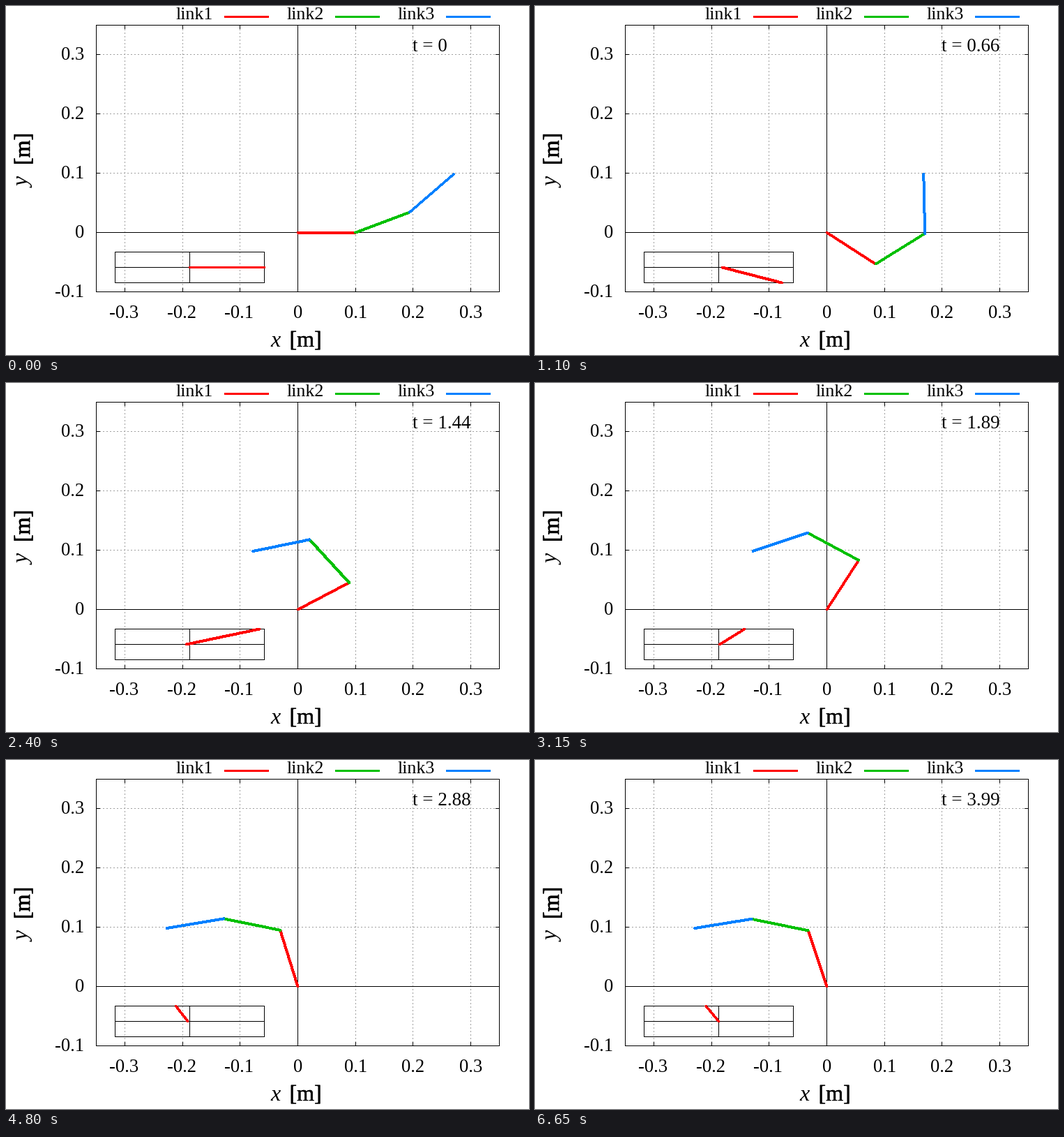
Recreate the animation shown at these times as a matplotlib script. Size 750 by 500 pixels, loop 6.7 s.

```python
import numpy as np
import matplotlib.pyplot as plt
from matplotlib.animation import FuncAnimation
from matplotlib.patheffects import Normal, Stroke

W, H, DPI = 750, 500, 100
PX = 72 / DPI
FRAMES, STEP_MS, DT = 134, 50, 0.03
LINK = 0.1
THICK = 3
RED, GREEN, BLUE = "#ff0000", "#00c000", "#0080ff"

plt.rcParams["font.family"] = "Liberation Serif"
fig = plt.figure(figsize=(W / DPI, H / DPI), dpi=DPI, facecolor="white")
ax = fig.add_axes([0, 0, 1, 1])
ax.set_xlim(0, W)
ax.set_ylim(H, 0)
ax.axis("off")

# Pixel centres of the plot frame and the inset
LEFT, RIGHT, TOP, BOTTOM = 129.5, 707.5, 27.5, 409.5
IN_L, IN_R, IN_T, IN_B = 156.5, 370.5, 352.5, 396.5
IN_X, IN_Y = 263.5, 374.5


def px(x):
    return LEFT + (x + 0.35) / 0.7 * (RIGHT - LEFT)


def py(y):
    return BOTTOM - (y + 0.1) / 0.45 * (BOTTOM - TOP)


def centre(v):
    return np.floor(v) + 0.5


def line(xs, ys, color="black", width=1, **kw):
    return ax.plot(xs, ys, color=color, lw=width * PX, antialiased=False,
                   snap=False, **kw)[0]


def label(x, y, s, size=26.67, heavy=0, **kw):
    txt = ax.text(x, y, s, fontsize=size * PX, va="baseline",
                  rotation_mode="anchor", **kw)
    if heavy:
        txt.set_path_effects([Stroke(linewidth=heavy * PX, foreground="black"),
                              Normal()])
    return txt


def box(l, r, t, b):
    line([l, r, r, l, l], [t, t, b, b, t], zorder=3,
         solid_joinstyle="miter", solid_capstyle="projecting")


def spline(knots, values):
    """Cubic spline at rest at both ends, held constant outside."""
    t, v = np.array(knots, float), np.array(values, float)
    h, s = np.diff(t), np.diff(v) / np.diff(t)
    n = len(t)
    a, rhs = np.eye(n), np.zeros(n)
    for i in range(1, n - 1):
        a[i, i - 1:i + 2] = h[i], 2 * (h[i - 1] + h[i]), h[i - 1]
        rhs[i] = 3 * (h[i] * s[i - 1] + h[i - 1] * s[i])
    m = np.linalg.solve(a, rhs)

    def at(x):
        x = min(max(x, t[0]), t[-1])
        i = min(np.searchsorted(t, x, side="right") - 1, n - 2)
        u = (x - t[i]) / h[i]
        return (v[i] * (1 + 2 * u) * (1 - u) ** 2 + v[i + 1] * u * u * (3 - 2 * u)
                + h[i] * u * (1 - u) * (m[i] * (1 - u) - m[i + 1] * u))

    return at


# Tip travel along a straight line, first joint angle, and base sway in inset pixels
travel = spline([0, 0.66, 1.44, 1.89, 2.52, 3.0],
                [0, 0.205, 0.6965, 0.798, 0.944, 1])
shoulder = spline([0, 0.42, 0.66, 0.84, 1.02, 1.26, 1.44, 1.89, 2.52, 3.0],
                  [0, -15, -32.1, -36, -27, 6, 27, 56.4, 93.8, 109])
sway = spline([0, 0.2, 0.5, 0.66, 0.84, 1.0, 1.26, 1.44, 1.68, 1.89,
               2.1, 2.52, 2.94, 3.27, 3.5, 3.78],
              [0, 2.5, 5, 5, -4, -5.5, -4.5, -5, 0, 1.5,
               0.5, -4, -2, 1, -0.4, 0])

BEND = np.radians(20)
START = LINK * (1 + np.cos(BEND) + np.cos(2 * BEND))
TIP_Y = LINK * (np.sin(BEND) + np.sin(2 * BEND))


def arm(t):
    """First joint angle and the ends of the three links."""
    a = np.radians(shoulder(t))
    p1 = LINK * np.array([np.cos(a), np.sin(a)])
    tip = np.array([START - 0.5 * travel(t), TIP_Y])
    d = tip - p1
    half = np.arccos(min(np.hypot(*d) / (2 * LINK), 1))
    b = np.arctan2(d[1], d[0]) - half
    p2 = p1 + LINK * np.array([np.cos(b), np.sin(b)])
    return a, [np.zeros(2), p1, p2, tip]


def inset_link(a, shift):
    """First link in the magnified view, cut at the inset border."""
    x0 = IN_X + shift
    dx = np.cos(a) * (IN_R - IN_X)
    dy = -np.sin(a) * (IN_B - IN_Y) * 2
    kx = ((IN_R if dx > 0 else IN_L) - x0) / dx if abs(dx) > 1e-9 else np.inf
    ky = (IN_B - IN_Y) / abs(dy) if abs(dy) > 1e-9 else np.inf
    k = min(kx, ky)
    return [x0, x0 + k * dx], [IN_Y, IN_Y + k * dy]


def place(ln, xs, ys):
    """Move a thick line; its cross-section is whole pixels along one axis."""
    dx, dy = abs(xs[1] - xs[0]), abs(ys[1] - ys[0])
    c = max(dx, dy) / np.hypot(dx, dy)
    ln.set_data(xs, ys)
    ln.set_linewidth(np.floor(THICK / c) * c * PX)


# Grid, ticks and numbers
dots = dict(color="#a0a0a0", dashes=(2, 3), dash_capstyle="butt", zorder=1)
tick = dict(solid_capstyle="butt", zorder=3)
for i in range(-3, 4):
    x = centre(px(i / 10))
    if i:
        line([x, x], [BOTTOM + 0.5, TOP], **dots)
    line([x, x], [BOTTOM, BOTTOM - 5.5], **tick)
    line([x, x], [TOP, TOP + 5.5], **tick)
    label(x - (1 if i < 0 else 0), 447, f"{i / 10:g}", ha="center")
for i in range(-1, 4):
    y = centre(py(i / 10))
    if i > 0:
        line([LEFT - 0.5, RIGHT], [y, y], **dots)
    line([LEFT, LEFT + 5.5], [y, y], **tick)
    line([RIGHT, RIGHT - 5.5], [y, y], **tick)
    label(112, y + 7.5, f"{i / 10:g}", ha="right")

X0, Y0 = centre(px(0)), centre(py(0))
line([X0, X0], [TOP, BOTTOM], zorder=2)
line([LEFT, RIGHT], [Y0, Y0], zorder=2)
box(LEFT, RIGHT, TOP, BOTTOM)
box(IN_L, IN_R, IN_T, IN_B)
line([IN_X, IN_X], [IN_T, IN_B], zorder=3)
line([IN_L, IN_R], [IN_Y, IN_Y], zorder=3)

# Axis titles
label(379, 488, "x", 32, style="italic")
label(406.5, 488, "[m]", 32, heavy=0.4)
label(34, 260, "y", 32, style="italic", rotation=90)
label(34, 228, "[m]", 32, heavy=0.8, rotation=90)

# Legend
for i, color in enumerate((RED, GREEN, BLUE)):
    x = 159 * i
    label(244 + x, 19, f"link{i + 1}", 26)
    line([313 + x, 377 + x], [15.5, 15.5], color, THICK, solid_capstyle="butt")

links = [line([], [], c, THICK, solid_capstyle="round", zorder=5)
         for c in (RED, GREEN, BLUE)]
zoom = line([], [], RED, THICK, solid_capstyle="round", zorder=5)
clock = label(583, 65, "", 27, zorder=6)


def update(i):
    t = i * DT
    a, pts = arm(t)
    for ln, p, q in zip(links, pts, pts[1:]):
        place(ln, [px(p[0]), px(q[0])], [py(p[1]), py(q[1])])
    place(zoom, *inset_link(a, sway(t)))
    clock.set_text(f"t = {round(t, 2):g}")
    return [*links, zoom, clock]


anim = FuncAnimation(fig, update, frames=FRAMES, interval=STEP_MS,
                     repeat=True, repeat_delay=0, blit=False)
plt.show()
```
